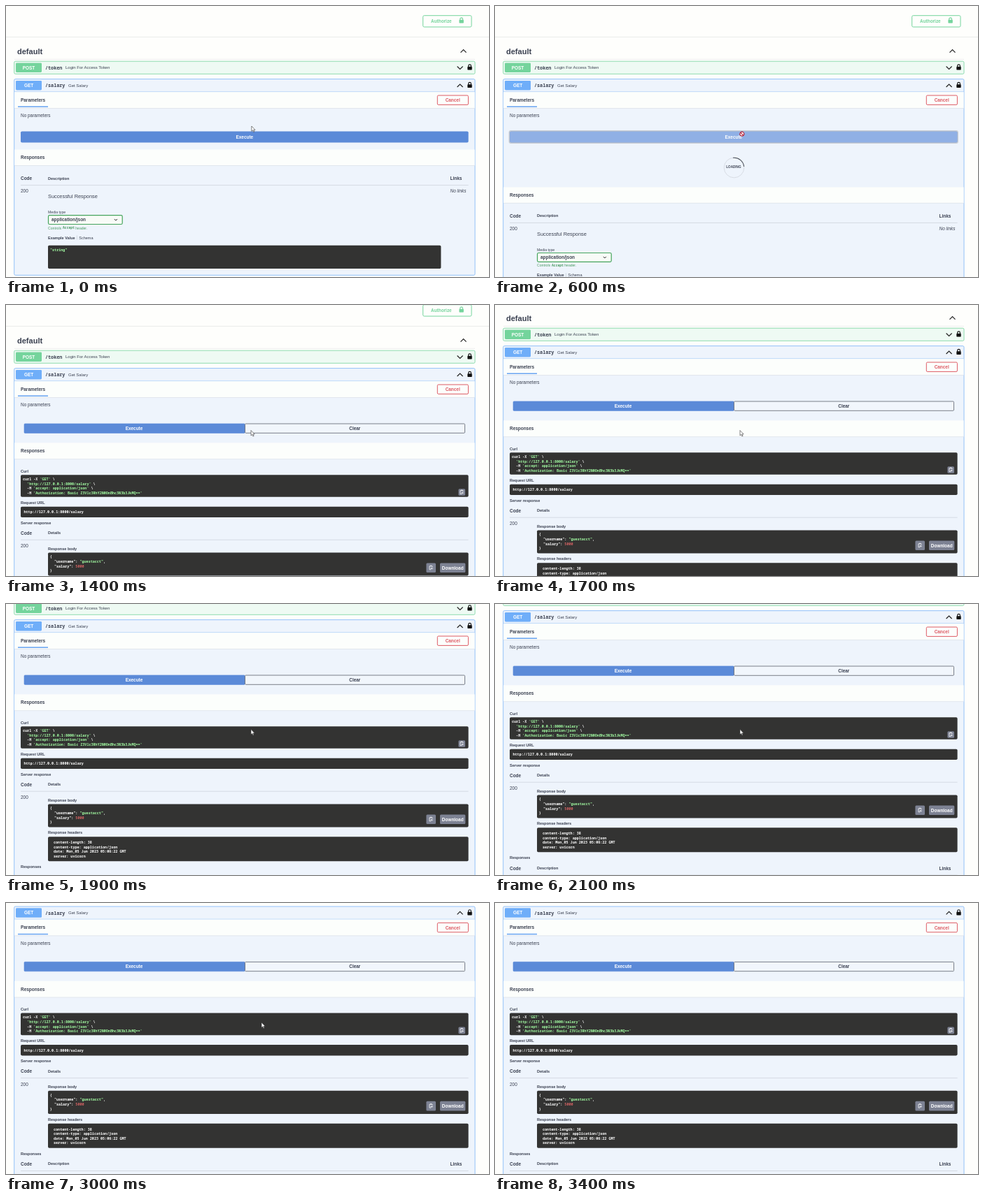
Animation of 690 by 388 pixels, one loop 3500 ms. Source, as an HTML page:

```html
<!DOCTYPE html>
<html lang="en">
<head>
<meta charset="utf-8">
<title>API docs</title>
<style>
html, body { margin: 0; width: 100%; height: 100%; overflow: hidden; background: #fefefc; }
svg { display: block; width: 690px; height: 388px; }
text { font-family: "Liberation Sans", Arial, sans-serif; fill: #3b4151; white-space: pre; }
.b { font-weight: 700; }
.i { font-style: italic; }
.m { font-family: "Noto Sans Mono", "DejaVu Sans Mono", monospace; font-weight: 700; }
</style>
</head>
<body>
<svg id="stage" viewBox="0 0 690 388" xmlns="http://www.w3.org/2000/svg"></svg>
<script>
const INK = '#3b4151', GREEN = '#74d49c', BLUE = '#6faef9', PANEL = '#eef4fc',
      STRIP = '#fcfefc', DARK = '#333332', GREY = '#7d8293', BTN = '#5b8ad8', RED = '#dd5a64';
const SMALL = 5.52, BASE = 6.44, CODE = 5.09;

// y is the middle of the capitals
const text = (x, y, s, size = BASE, cls = 'b', fill = INK, anchor = 'start') =>
  `<text x="${x}" y="${y + size * .36}" font-size="${size}" class="${cls}" style="fill:${fill}" text-anchor="${anchor}">${s}</text>`;
const rect = (x1, y1, x2, y2, fill, stroke = 'none', r = 0, w = .8) =>
  `<rect x="${x1}" y="${y1}" width="${x2 - x1}" height="${y2 - y1}" rx="${r}" fill="${fill}" stroke="${stroke}" stroke-width="${w}"/>`;
const line = (x1, x2, y, color = '#c3c9d2', w = .6) =>
  `<path d="M${x1} ${y}H${x2}" stroke="${color}" stroke-width="${w}"/>`;
const chevron = (x, y, dir, r = 4, w = 1.2) =>
  `<path d="M${x - r} ${y + dir * r / 2}L${x} ${y - dir * r / 2}L${x + r} ${y + dir * r / 2}" fill="none" stroke="#222" stroke-width="${w}"/>`;
const lock = (x, y, color) =>
  `<path d="M${x - 1.9} ${y}v-1.6a1.9 1.9 0 0 1 3.8 0v1.6" fill="none" stroke="${color}" stroke-width="1.1"/>` +
  rect(x - 3.2, y - .6, x + 3.2, y + 4.1, color, 'none', .7);
const str = s => `<tspan style="fill:#a2fca2">${s}</tspan>`;
const num = s => `<tspan style="fill:#d36363">${s}</tspan>`;
const code = (x, y, rows) =>
  rows.map((s, i) => text(x, y + i * 6.6, s, CODE, 'm', '#fff')).join('');
const box = (x1, y1, x2, y2) => rect(x1, y1, x2, y2, DARK, 'none', 1.8);
const copy = (x, y, r) =>
  rect(x - r, y - r, x + r, y + r, GREY, 'none', 1.5) +
  `<g fill="none" stroke="#fff" stroke-width=".8"><path d="M${x + 1.8} ${y - .8}v-1.6h-4v5h2.2M${x - 1} ${y - 2.9}h1.8"/>` +
  `<path d="M${x + 2.8} ${y + 1}h-3m1.2-1.2l-1.2 1.2 1.2 1.2"/></g>`;
const strip = (y1, y2) =>
  rect(12, y1, 669.6, y2, STRIP) + line(12, 669.6, y2 + .3, '#dde3ea', .8);
const summary = (y, verb, path, label, color, dir) =>
  rect(14, y - 6.8, 51, y + 6.7, color, 'none', 1.4) +
  text(32.5, y, verb, BASE, 'b', '#fff', 'middle') +
  text(56, y, path, 6.75, 'm') +
  text(85 + (dir > 0 ? 4 : 0), y, label, 5.98, '') +
  chevron(648.6, y + .3, dir) + lock(662.5, y - .8, '#111');

const header =
  rect(595.7, 13.7, 665, 30, 'none', GREEN, 1.8, 1) +
  text(607, 21.8, 'Authorize', BASE, 'b', GREEN) + lock(650.6, 20.4, GREEN) +
  line(0, 690, 44.4, '#e6e8e6', .8) +
  text(16, 65, 'default', 11.04) + chevron(653.5, 64.6, 1) +
  line(12, 670, 76.3, '#e2e4e6') +
  rect(11.7, 79.2, 670, 97.3, '#eefaf3', GREEN, 1.8) +
  summary(88.2, 'POST', '/token', 'Login For Access Token', GREEN, -1);

const operation =
  summary(113.7, 'GET', '/salary', 'Get Salary', BLUE, 1) +
  line(12, 669.6, 122.8, '#8bbcf5') + strip(123.2, 146.2) +
  text(21, 134.5, 'Parameters') + rect(17, 143.4, 60, 145, '#6fa8f2') +
  rect(616.3, 128, 660.4, 141.4, 'none', RED, 1.5, 1) +
  text(638.2, 134.8, 'Cancel', BASE, 'b', RED, 'middle') +
  text(21, 157, 'No parameters', BASE, '');

const panel = bottom => rect(11.7, 104.6, 670, bottom, PANEL, '#79b3f8', 1.8);

const wideButton =
  `<g id="halo">${rect(20.5, 179, 661, 196, 'none', 'rgba(0,0,0,.16)', 2, 1.8)}</g>` +
  `<g id="execute">${rect(21, 179.4, 660.6, 195.6, BTN, 'none', 1.8)}</g>` +
  text(340.8, 187.7, 'Execute', BASE, 'b', '#fff', 'middle');

const responses =
  strip(205.6, 228.2) + text(21, 216.5, 'Responses') +
  text(21, 246.7, 'Code') + text(60, 246.6, 'Description', SMALL) + text(634.5, 246.7, 'Links') +
  line(21, 660.6, 256.6) +
  text(21, 265, '200', BASE, '') + text(634.5, 265, 'No links', BASE, 'i') +
  text(60, 272.7, 'Successful Response', 7.36, '') +
  text(60, 295, 'Media type', 5.15, '') +
  rect(60.5, 299.7, 166.2, 312.5, '#f8fbf7', '#45a45c', 1.8, 1.2) +
  text(65, 306, 'application/json') + chevron(156.8, 306.1, -1, 2, 1) +
  text(60, 317.7, 'Controls', 5.15, '', '#4b9b62') + text(81, 317.7, 'Accept', 4.7, 'm', '#4b9b62') +
  text(99.3, 317.7, 'header.', 5.06, '', '#4b9b62') +
  text(60, 331.7, 'Example Value', SMALL) + `<path d="M101.4 328.5v6" stroke="#b5bac2" stroke-width=".5"/>` +
  text(104.3, 331.7, 'Schema', SMALL, '') +
  box(60, 342.8, 621.4, 376) + code(63, 348.8, [str('"string"')]);

const spinner =
  `<circle cx="341.5" cy="231.5" r="14.3" fill="none" stroke="#d5dae1" stroke-width=".9"/>` +
  `<path id="arc" d="M341.5 217.2A14.3 14.3 0 0 1 355.8 231.5" fill="none" stroke="#4a4f58" stroke-width="1"/>` +
  text(340.9, 230.8, 'LOADING', 4.6, 'b', INK, 'middle');

const result =
  rect(26, 183.9, 341.3, 197.4, BTN, BTN, 1.2, .6) +
  text(183, 190.7, 'Execute', BASE, 'b', '#fff', 'middle') +
  rect(341.5, 184, 655.5, 197.3, '#f1f6fc', '#6d727b', 1.2, .9) +
  text(498.3, 190.7, 'Clear', BASE, 'b', INK, 'middle') +
  strip(211.3, 234.4) + text(21, 222.9, 'Responses') +
  text(21, 251.6, 'Curl', SMALL) + box(21, 257.2, 660.6, 288.8) +
  code(24, 263.2, [
    `curl -X ${str("'GET'")} \\`,
    `  ${str("'http://127.0.0.1:8000/salary'")} \\`,
    `  -H ${str("'accept: application/json'")} \\`,
    `  -H ${str("'Authorization: Basic Z3Vlc3RhY2N0OnBhc3N3b3JkMQ=='")}`]) +
  copy(651.2, 282, 4.8) +
  text(21, 296.7, 'Request URL', SMALL) + box(21, 302.7, 660.6, 318) +
  code(25.5, 310.3, ['http://127.0.0.1:8000/salary']) +
  text(21, 325.7, 'Server response', SMALL) +
  text(21, 340.6, 'Code') + text(60, 340.4, 'Details', SMALL) + line(21, 660.6, 350.2) +
  text(21, 359, '200', BASE, '') +
  text(60, 362.9, 'Response body', SMALL) + box(60, 368.4, 660.6, 401.6) +
  code(62.8, 374.6, [
    '{',
    `  "username": ${str('"guestacct"')},`,
    `  "salary": ${num('5000')}`,
    '}']) +
  copy(607.2, 390.2, 6.8) + rect(620, 383.4, 656.3, 397, GREY, 'none', 1.5) +
  text(638.2, 390.2, 'Download', BASE, 'b', '#fff', 'middle') +
  text(60, 409.3, 'Response headers', SMALL) + box(60, 415.3, 660.6, 450.3) +
  code(68, 423.3, [
    'content-length: 38',
    'content-type: application/json',
    'date: Mon,05 Jun 2023 05:06:22 GMT',
    'server: uvicorn']) +
  text(21, 458.2, 'Responses', SMALL) +
  text(21, 473.2, 'Code') + text(60, 473.1, 'Description', SMALL) + text(634.5, 473.2, 'Links') +
  line(21, 660.6, 483.1);

const cursors = {
  arrow: `<path d="M0 0V7.4L1.7 5.8 2.9 8.5 4.1 8 2.9 5.4H5.2Z" fill="#fff" stroke="#333" stroke-width=".6"/>`,
  hand: `<path d="M0 .6Q.8-.4 1.6.6V3.4L4.8 4Q5.6 4.3 5.4 5.4L4.8 8.4H.9L-1.6 5.3Q-1.4 4.2 0 5.2Z" fill="#fff" stroke="#333" stroke-width=".6"/>`,
  blocked: `<circle r="3" fill="#fff" stroke="#b3243c" stroke-width="1.2"/><path d="M-2.1-2.1L2.1 2.1" stroke="#b3243c" stroke-width="1.2"/>`
};

const group = (id, body) => `<g id="${id}">${body}</g>`;
document.getElementById('stage').innerHTML = group('page',
  header + group('panelIdle', panel(385.4)) + group('panelLong', panel(620)) + operation +
  group('idle', wideButton + group('responses', responses)) +
  group('spinner', spinner) + group('result', result)) +
  Object.entries(cursors).map(([id, body]) => group(id, body)).join('');

// [start ms, cursor, x, y]
const pointer = [
  [0, 'arrow', 350.8, 172], [100, 'arrow', 351, 176], [200, 'hand', 351, 181],
  [600, 'blocked', 352.8, 183.2], [800, 'arrow', 350, 179.5],
  [3000, 'arrow', 365, 171], [3100, 'arrow', 437, 119],
  [3200, 'arrow', 607, 33], [3300, 'arrow', 679, 4], [3400, '', 0, 0]
];
const LOOP = 3500, STEP = 100, LOAD = 600, DONE = 800, SCROLL = 1300;
const offsets = [4, 14, 25, 36, 46, 64, 82, 90, 95, 98, 99.6];

const el = id => document.getElementById(id);
const show = (id, on) => el(id).setAttribute('display', on ? 'inline' : 'none');
const move = (id, x, y) => el(id).setAttribute('transform', `translate(${x} ${y})`);

function draw(time) {
  const t = Math.floor(time % LOOP / STEP) * STEP;
  const loading = t >= LOAD && t < DONE, done = t >= DONE;

  show('panelIdle', t < LOAD);
  show('panelLong', t >= LOAD);
  show('idle', !done);
  show('spinner', loading);
  show('result', done);
  show('halo', t >= 200);
  el('execute').setAttribute('opacity', loading ? .64 : 1);
  move('responses', 0, loading ? 53.8 : 0);
  el('arc').setAttribute('transform', `rotate(${(t - LOAD) * .36 - 6} 341.5 231.5)`);

  const i = Math.min((t - SCROLL) / STEP, offsets.length - 1);
  move('page', 0, i < 0 ? 0 : -offsets[i]);

  const [, kind, x, y] = pointer.findLast(p => p[0] <= t);
  for (const id in cursors) show(id, id === kind);
  if (kind) move(kind, x, y);
}

const start = performance.now();
function tick() {
  draw(performance.now() - start);
  requestAnimationFrame(tick);
}
tick();
</script>
</body>
</html>
```
